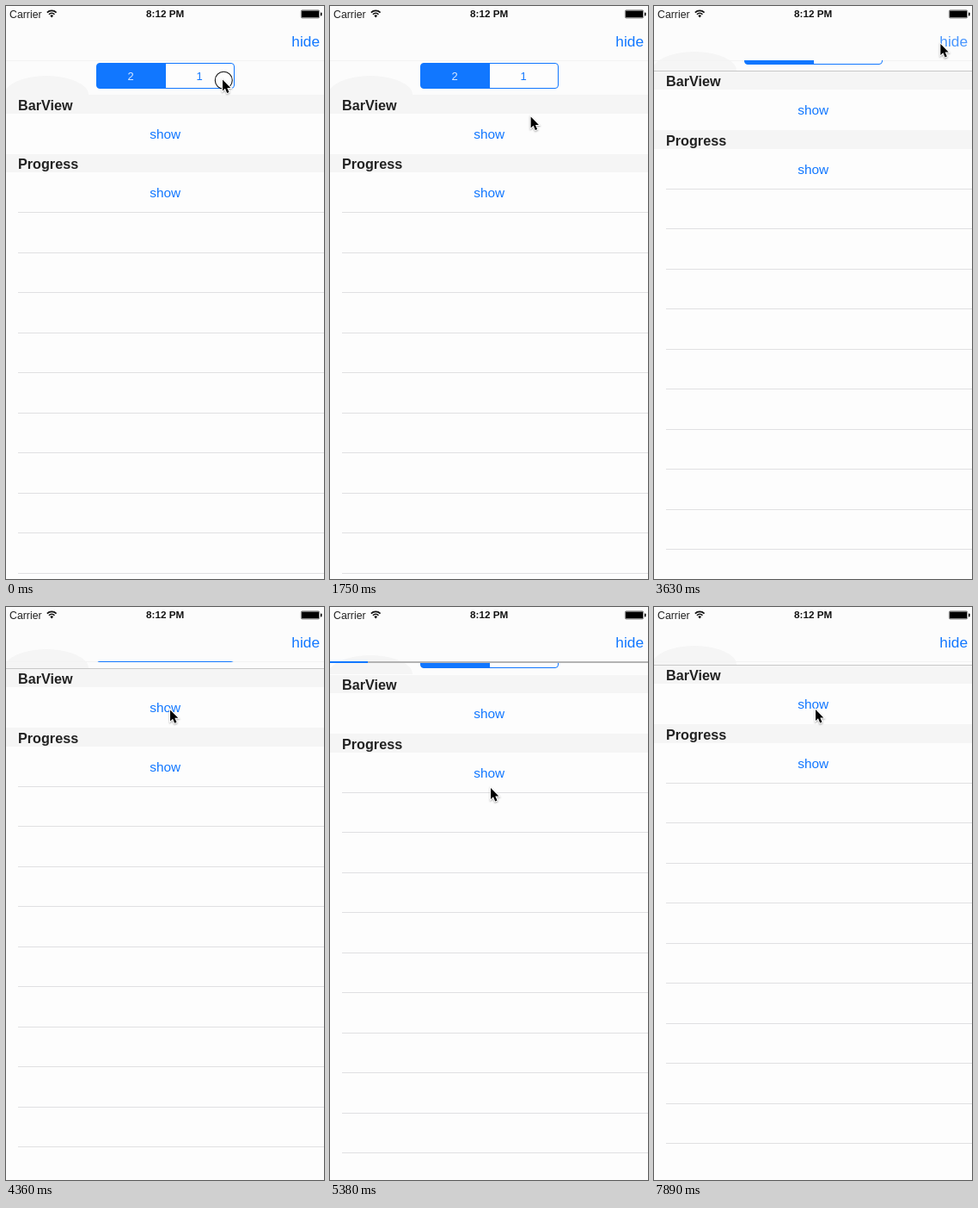
An HTML page with a canvas for the animation above (8 s loop, 370 by 665 pixels).

```html
<!DOCTYPE html>
<html lang="en">
<head>
<meta charset="utf-8">
<title>Bar view demo</title>
<style>
  html, body { margin: 0; width: 100%; height: 100%; overflow: hidden; background: #fdfdfd; }
  canvas { display: block; width: 370px; height: 665px; }
</style>
</head>
<body>
<canvas id="stage"></canvas>
<script>
const W = 370, H = 665, LOOP = 8000;
const STEP = 145.5, LAST_STEP = 54;
const MOVE = 430, HOLD = 200, SLIDE = 373, FILL = 1106;
const BLUE = '#1177ff', PAPER = '#fdfdfd', BAR = '#fcfcfc', GREY = '#f5f5f5';
const FONT = '"Liberation Sans", Arial, sans-serif';

const canvas = document.getElementById('stage');
const ctx = canvas.getContext('2d');
const dpr = window.devicePixelRatio || 1;
canvas.width = W * dpr;
canvas.height = H * dpr;

// Where the pointer arrives, when, and what it taps there
const STOPS = [
  { at: 0, x: 252, y: 85.5, tap: 'one' },
  { at: 780, x: 151.5, y: 78, tap: 'two' },
  { at: 1170, x: 182, y: 140 },
  { at: 1800, x: 236, y: 128 },
  { at: 2330, x: 194, y: 140.5 },
  { at: 3200, x: 333.5, y: 44, tap: 'hide' },
  { at: 4060, x: 190, y: 108, tap: 'bar' },
  { at: 4640, x: 195.5, y: 169 },
  { at: 4950, x: 187, y: 210, tap: 'progress' },
  { at: 6250, x: 186, y: 184 },
  { at: 7270, x: 188, y: 119 },
  { at: 7631, x: 188, y: 119, tap: 'bar' }
];
const TAPS = STOPS.filter(s => s.tap);
const SHIFT_AFTER = { hide: 39, bar: 0, progress: 36 };

const clamp = v => Math.max(0, Math.min(1, v));
const smooth = p => p * p * (3 - 2 * p);
const mix = (a, b, p) => a + (b - a) * p;
const release = s => s.at + (s.tap ? HOLD : 0);
const held = t => TAPS.find(s => t >= s.at && t < release(s));
const lastReleased = (t, names) => TAPS.filter(s => names.includes(s.tap) && t >= release(s)).pop();

function pointer(t) {
  const i = STOPS.findIndex(s => s.at > t);
  if (i < 0) return STOPS[STOPS.length - 1];
  const from = STOPS[i - 1], to = STOPS[i];
  const start = Math.max(to.at - MOVE, release(from));
  const p = smooth(clamp((t - start) / (to.at - start)));
  return { x: mix(from.x, to.x, p), y: mix(from.y, to.y, p) };
}

function listShift(t) {
  let shift = 0;
  for (const s of TAPS) {
    if (s.tap in SHIFT_AFTER) {
      shift = mix(shift, SHIFT_AFTER[s.tap], smooth(clamp((t - release(s)) / SLIDE)));
    }
  }
  return Math.round(shift * 2) / 2;
}

function rect(x, y, w, h, color) {
  ctx.fillStyle = color;
  ctx.fillRect(x, y, w, h);
}

function text(str, x, y, size, color, align = 'left', weight = 'normal') {
  ctx.font = `${weight} ${size}px ${FONT}`;
  ctx.textAlign = align;
  ctx.fillStyle = color;
  ctx.fillText(str, x, y);
}

function button(label, x, y, size, align, alpha) {
  ctx.globalAlpha = alpha;
  text(label, x, y, size, BLUE, align);
  ctx.globalAlpha = 1;
}

function list(shift, pressed) {
  ['BarView', 'Progress'].forEach((title, i) => {
    const offset = i * 68.5 - shift;
    const top = Math.ceil(103 + offset);
    rect(0, top, W, Math.floor(125 + offset) - top, GREY);
    text(title, 14, Math.floor(121 + offset), 16.2, '#222', 'left', 'bold');
    const alpha = pressed === (i ? 'progress' : 'bar') ? 0.35 : 1;
    button('show', 185.2, Math.floor(154 + offset), 15.4, 'center', alpha);
  });
  for (let i = 0; i < 11; i++) {
    rect(14, Math.floor(239.5 + i * 46.5 - shift), W - 14, 1, '#e0e0e2');
  }
}

function segments(t, shift) {
  const y = 66 - Math.ceil(shift);
  const picked = lastReleased(t, ['one', 'two']);
  const chosen = picked && picked.tap === 'one' ? 1 : 0;
  const press = held(t - HOLD / 2) && held(t);
  const lit = !press ? -1 : press.tap === 'one' ? 1 : press.tap === 'two' ? 0 : -1;
  ctx.save();
  ctx.beginPath();
  ctx.rect(0, 63, W, H);
  ctx.clip();
  ctx.beginPath();
  ctx.roundRect(105.5, y + 0.5, 160, 29, 3.5);
  ctx.save();
  ctx.clip();
  for (let i = 0; i < 2; i++) {
    rect(105 + i * 80, y, 81, 30, i === chosen ? BLUE : i === lit ? '#d2e6fb' : PAPER);
  }
  ctx.restore();
  ctx.strokeStyle = BLUE;
  ctx.lineWidth = 1;
  ctx.stroke();
  rect(185, y, 1, 30, BLUE);
  ['2', '1'].forEach((label, i) => {
    const color = i === chosen ? '#d8e8ff' : i === lit ? '#6aabf7' : BLUE;
    text(label, 145 + i * 80, y + 19.5, 13, color, 'center');
  });
  ctx.restore();
}

// Header text glowing through the translucent bar
function haze(edge, stepped) {
  if (stepped) {
    for (let i = 0; i < 3; i++) {
      const x = Math.max(0, 18 - 16 * i), y = 43 + 8 * i;
      rect(x, y, 82 + 8 * i - x, Math.min(8, 63 - y), GREY);
    }
    return;
  }
  ctx.beginPath();
  ctx.ellipse(47, edge, 49, 22, 0, Math.PI, Math.PI * 2);
  ctx.fillStyle = GREY;
  ctx.fill();
}

function statusBar() {
  text('Carrier', 4, 14, 12.3, '#222');
  text('8:12 PM', 185.2, 13, 11.7, '#111', 'center', 'bold');
  ctx.strokeStyle = '#111';
  ctx.lineWidth = 1.7;
  for (const r of [4.6, 7.6]) {
    ctx.beginPath();
    ctx.arc(53.2, 13, r, -Math.PI * 0.75, -Math.PI * 0.25);
    ctx.stroke();
  }
  ctx.beginPath();
  ctx.moveTo(53.2, 13.6);
  ctx.arc(53.2, 13, 2.6, -Math.PI * 0.75, -Math.PI * 0.25);
  ctx.fillStyle = '#111';
  ctx.fill();

  ctx.beginPath();
  ctx.roundRect(343.3, 4.8, 21.4, 9.2, 1.5);
  ctx.lineWidth = 0.5;
  ctx.stroke();
  rect(344, 5.5, 20, 7.8, '#000');
  ctx.beginPath();
  ctx.roundRect(366, 7.5, 1.5, 4, 0.7);
  ctx.fill();
}

function progressBar(elapsed) {
  const p = clamp(elapsed / FILL);
  rect(0, 63, W, 2, '#b3b3b3');
  rect(0, 63, Math.round(W * 0.4 * (1 - Math.pow(1 - p, 1.5))), 2, BLUE);
}

function drawPointer(t) {
  const { x, y } = pointer(t);
  ctx.save();
  ctx.translate(x, y);
  if (held(t)) {
    ctx.beginPath();
    ctx.arc(1.3, 0.7, 10, 0, Math.PI * 2);
    ctx.strokeStyle = '#111';
    ctx.lineWidth = 1.1;
    ctx.stroke();
  }
  const arrow = new Path2D('M0 0V13L3 10.3L5.2 15.4L7.5 14.4L5.3 9.4H9.3Z');
  ctx.shadowColor = 'rgba(0,0,0,.35)';
  ctx.shadowBlur = 2 * dpr;
  ctx.shadowOffsetY = dpr;
  ctx.strokeStyle = '#fff';
  ctx.lineWidth = 2;
  ctx.stroke(arrow);
  ctx.shadowColor = 'transparent';
  ctx.fillStyle = '#000';
  ctx.fill(arrow);
  ctx.restore();
}

function draw(t) {
  const shift = listShift(t);
  const edge = Math.floor(103 - shift);
  const press = held(t);
  const pressed = press && press.tap;
  const action = lastReleased(t, Object.keys(SHIFT_AFTER));
  const progress = action && action.tap === 'progress';

  ctx.setTransform(dpr, 0, 0, dpr, 0, 0);
  rect(0, 0, W, H, PAPER);
  list(shift, pressed);
  rect(0, 0, W, edge, BAR);
  haze(edge, progress && shift === SHIFT_AFTER.progress);
  rect(0, 63, W, 1, '#f3f3f3');
  segments(t, shift);
  if (progress) progressBar(t - release(action));
  else if (shift > 0) rect(0, edge, W, 1, '#c8c8c8');

  const hidden = lastReleased(t, ['hide']);
  const fade = hidden ? clamp((t - release(hidden)) / SLIDE) : 1;
  button('hide', 365, 47, 17.3, 'right', pressed === 'hide' ? 0.35 : mix(0.35, 1, fade));
  statusBar();
  drawPointer(t);
}

function tick(now) {
  const step = Math.min(LAST_STEP, Math.floor((now % LOOP + 10) / STEP));
  draw(step * STEP);
  requestAnimationFrame(tick);
}
tick(performance.now());
</script>
</body>
</html>
```
